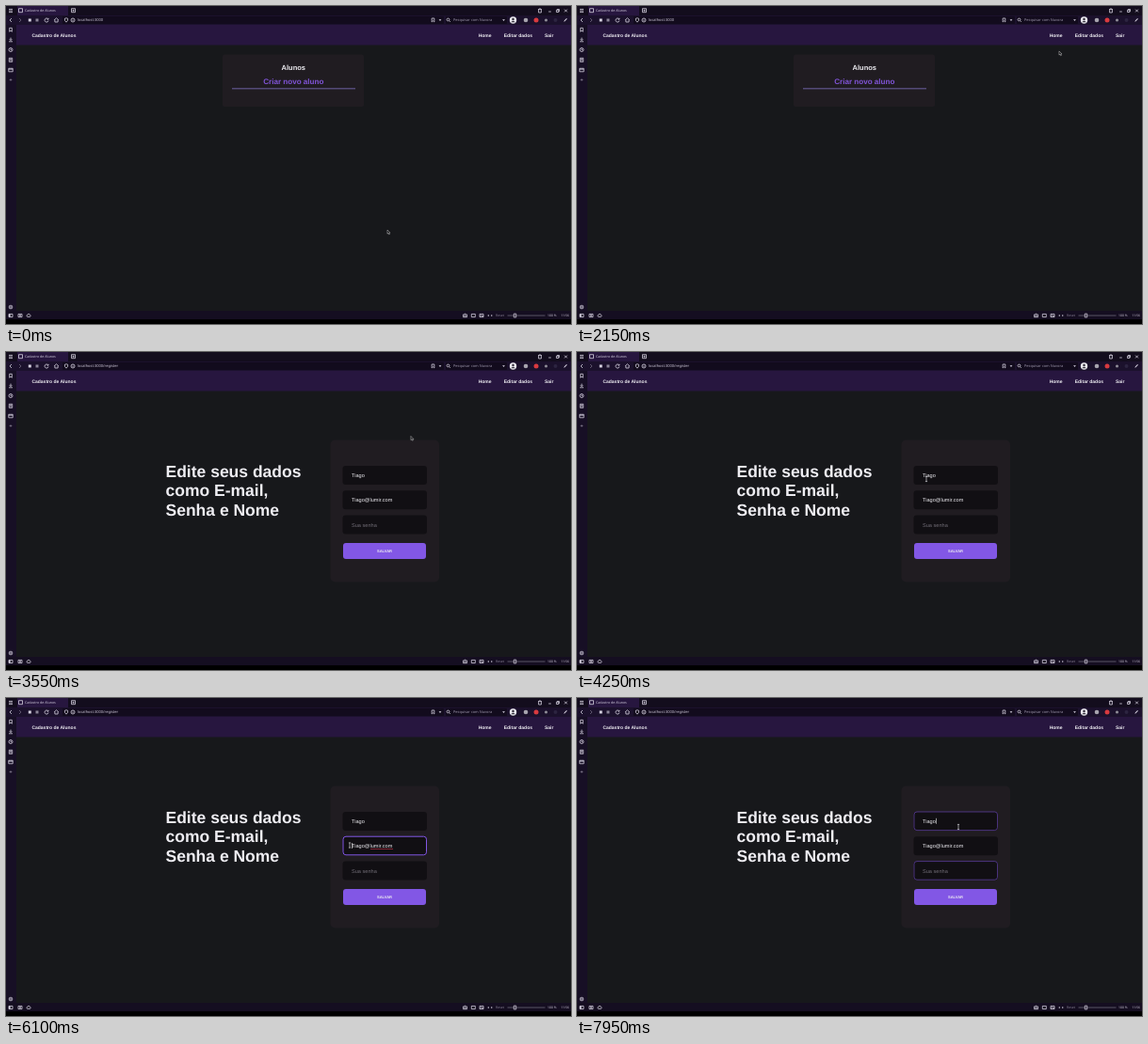
An HTML page for the animation above (8000 ms loop, 600 by 338 pixels).

```html
<!DOCTYPE html>
<html lang="pt-BR">
<head>
<meta charset="utf-8">
<title>Cadastro de Alunos</title>
<style>
  html, body { margin: 0; width: 100%; height: 100%; overflow: hidden; background: #17181b; }
  svg { display: block; width: 100vw; height: 100vh; }
  text { font-family: "Liberation Sans", Arial, sans-serif; fill: #eeedf2; text-rendering: geometricPrecision; white-space: pre; }
  .b { font-weight: 700; }
  .ui text { font-family: "Noto Sans", "Open Sans", sans-serif; fill: #cfc9da; }
  .icon { fill: none; stroke: #d5d0df; stroke-width: .8; }
  .solid { fill: #d5d0df; stroke: none; }
  .dim { opacity: .45; }
  .ring { fill: none; stroke: #8257e5; stroke-width: 1; }
</style>
</head>
<body>
<svg viewBox="0 0 600 338" preserveAspectRatio="none">
  <rect width="600" height="338" fill="#17181b"/>

  <g id="nav">
    <rect x="11" y="20" width="589" height="21.5" fill="#27163f"/>
    <rect id="hover" x="526" y="25" width="36" height="12" rx="1.5" fill="#131017"/>
    <g class="b" font-size="5">
      <text x="27.4" y="32.5">Cadastro de Alunos</text>
      <text x="501.7" y="32.5">Home</text>
      <text x="528.7" y="32.5">Editar dados</text>
      <text x="572" y="32.5">Sair</text>
    </g>
  </g>

  <g id="home">
    <rect x="230" y="51.5" width="150" height="55.5" rx="2.5" fill="#201c21"/>
    <g class="b" text-anchor="middle">
      <text x="305.3" y="67.5" font-size="7.5">Alunos</text>
      <text x="305.3" y="82.5" font-size="8.1" style="fill:#8054d8">Criar novo aluno</text>
    </g>
    <rect x="240" y="87.4" width="131" height=".9" fill="#7668b0"/>
  </g>

  <g id="edit">
    <g class="b" font-size="17.5">
      <text x="169.5" y="132.9">Edite seus dados</text>
      <text x="169.5" y="153.3">como E-mail,</text>
      <text x="169.5" y="173.7">Senha e Nome</text>
    </g>
    <rect x="344.5" y="93.5" width="115.5" height="151" rx="5" fill="#201c21"/>
    <g id="fields"></g>
    <rect x="358" y="203" width="88" height="17" rx="3" fill="#8257e5"/>
    <text class="b" x="402" y="213" font-size="4.06" text-anchor="middle">SALVAR</text>
    <rect id="caret" width=".6" height="6" fill="#eee"/>
  </g>

  <g class="ui">
    <rect width="600" height="10" fill="#130d1d"/>
    <rect x="12" width="54" height="10" fill="#27163f"/>
    <rect y="10" width="600" height="10" fill="#1b112c"/>
    <rect x="60" y="11" width="405" height="8" rx="1" fill="#120b1d"/>
    <rect x="467" y="11" width="65" height="8" rx="1" fill="#120b1d"/>
    <rect y="20" width="11" height="304" fill="#170f25"/>
    <rect y="324" width="600" height="9" fill="#150e21"/>
    <rect y="333" width="600" height="5" fill="#000"/>
    <g id="icons"></g>
    <text x="20" y="6.2" font-size="3.6">Cadastro de Alunos</text>
    <text id="url" x="76" y="16.4" font-size="4"></text>
    <text x="475" y="16.3" font-size="3.9" style="fill:#9a93a8">Pesquisar com Nuvora</text>
    <text id="status" x="30" y="330.2" font-size="3.55"></text>
    <text x="520" y="330.2" font-size="3.5" style="fill:#817a8d">Reset</text>
    <text x="575" y="330.2" font-size="3.4">100 %</text>
    <text x="589.2" y="330.2" font-size="3.4">11:56</text>
  </g>

  <g id="cursor" stroke-linejoin="round">
    <path data-shape="arrow" d="M0 0V4.2L1 3.3L1.7 4.8L2.4 4.5L1.7 3.1H3Z" fill="#0c0c0e" stroke="#d8d8dc" stroke-width=".45"/>
    <path data-shape="hand" d="M-.4 0Q0 -.5.4 0V1.7L2.3 2.2V3.8L1.6 5H-.4L-1.7 3L-1.2 2.5L-.4 3.1Z" fill="#0c0c0e" stroke="#d8d8dc" stroke-width=".45"/>
    <path data-shape="beam" d="M-1.1 -2.6H1.1M0 -2.6V2.6M-1.1 2.6H1.1" fill="none" stroke="#dedee2" stroke-width=".65"/>
  </g>
</svg>
<script>
const LOOP = 8000, STEP = 50, FADE = 200;
const $ = id => document.getElementById(id);

// [path, x, y, class]; paths are drawn around their own centre
const SQUARE = 'M-2-1.6H2V1.6H-2Z';
const BOX = 'M-1.5-1.5H1.5V1.5H-1.5Z';
const MARK = 'M-1.3-2H1.3V2L0 .8L-1.3 2Z';
const DISC = 'M-2 0A2 2 0 1 1 2 0A2 2 0 1 1-2 0Z';
const PLUS = 'M-1.4 0H1.4M0-1.4V1.4';
const DOWN = 'M-1.4-.8H1.4L0 1Z';
const ICONS = [
  ['M-2-1.6H2M-2 0H2M-2 1.6H2', 5, 5], ['M-2-2H2V2H-2Z', 15.5, 4.7],
  ['M-2-2H2V2H-2ZM-1 0H1M0-1V1', 71.5, 4.7], ['M-2-1.4H2M-1.4-1.4V2H1.4V-1.4M-.7-2.2H.7', 567, 5],
  ['M-1.3 1H1.3', 577.5, 5], ['M-1.5-.7H.8V1.5H-1.5ZM-.6-.7V-1.5H1.5V.7H.8', 586, 5],
  ['M-1.4-1.4L1.4 1.4M1.4-1.4L-1.4 1.4', 594.5, 5],
  ['M1-2L-1 0L1 2', 5, 15], ['M-1-2L1 0L-1 2', 15, 15, 'dim'],
  [BOX, 25.3, 15, 'solid'], ['M-1.3-1.6H-.4V1.6H-1.3ZM.4-1.6H1.3V1.6H.4Z', 33, 15, 'solid'],
  ['M1.6-1.2A2 2 0 1 0 2 .5M2-2.2V-.8H.6', 43, 15], ['M-2.4 0L0-2.2L2.4 0M-1.6-.4V2H1.6V-.4', 53.5, 15],
  ['M-1.6-1.7L0-2.2L1.6-1.7V.4L0 2.2L-1.6 .4Z', 64, 15], [DISC + 'M0-.2V1.1M0-1.2V-.7', 71, 15],
  [MARK, 453.5, 15], [DOWN, 461, 15, 'solid'],
  ['M1.8 1.8L.6.6M.9-.5A1.4 1.4 0 1 1-1.9-.5A1.4 1.4 0 1 1 .9-.5', 470, 15], [DOWN, 528.5, 15, 'solid'],
  ['M-1.7 1.7L-1.2.5L1.2-1.9L1.9-1.2L-.5 1.2Z', 594, 15, 'solid'],
  [MARK, 5, 25.3], ['M0-2.2V.6M-1.3-.6L0 .8L1.3-.6M-2 2H2', 5, 35.8], [DISC + 'M0-1.2V.2H1', 5, 46.5],
  ['M-1.7-2H1.7V2H-1.7ZM-.9-.7H.9M-.9.6H.9', 5, 57.3], ['M-2.2-1.7H2.2V1.8H-2.2ZM-2.2-.8H2.2', 5, 68], [PLUS, 5, 78.5, 'dim'],
  ['M-1.3 0A1.3 1.3 0 1 1 1.3 0A1.3 1.3 0 1 1-1.3 0M0-2.3V-1.3M0 1.3V2.3M-2.3 0H-1.3M1.3 0H2.3M-1.6-1.6L-1-1M1 1L1.6 1.6M1.6-1.6L1-1M-1 1L-1.6 1.6', 5, 320],
  [SQUARE, 5, 329], ['M-2-1.6H-.3V1.6H-2Z', 5, 329, 'solid'], [SQUARE + 'M-1 0H1M0-1V1', 15, 329],
  ['M-1.3 1.3A1.1 1.1 0 0 1-1.2-.8A1.4 1.4 0 0 1 1.4-.8A1.1 1.1 0 0 1 1.4 1.3Z', 24, 329],
  ['M-2-1.1H-1L-.5-1.8H.5L1-1.1H2V1.7H-2ZM-.7.3A.7.7 0 1 1 .7.3A.7.7 0 1 1-.7.3', 487.5, 329],
  [SQUARE, 496.3, 329], [SQUARE + 'M-1.6 1L-.5-.4L.4.5L1-.1L1.7 1', 505, 329], ['M-1.5-1L-2 0L-1.5 1M1.5-1L2 0L1.5 1', 514, 329],
  ['M-20 0H20', 552.5, 329, 'dim'], ['M-1.2-1.9H1.2V1.9H-1.2Z', 540.5, 329]
];
const BADGES = [[538.5, '#e9e8ee', 3.7], [552, '#a7a4ae', 2.3], [563, '#d83a3f', 2.5], [573.5, '#8e8b96', 1.6], [583.5, '#2c2440', 2]];

$('icons').innerHTML =
  ICONS.map(([d, x, y, c = '']) => `<path class="icon ${c}" d="${d}" transform="translate(${x} ${y})"/>`).join('') +
  BADGES.map(([x, c, r]) => `<circle cx="${x}" cy="15" r="${r}" fill="${c}"/>`).join('') +
  '<circle cx="538.5" cy="14" r="1.2" fill="#2b2733"/><path d="M536.2 17.3Q538.5 14.2 540.8 17.3Z" fill="#2b2733"/>';

// Form fields: top edge, text and the spans of time with focus
const FIELDS = [
  { y: 121, text: 'Tiago', focus: [[4500, 5700], [7850, 9000]] },
  { y: 147.2, text: 'Tiago@lumir.com', focus: [[5700, 6600]] },
  { y: 173.6, text: 'Sua senha', hint: true, focus: [[6600, 7850]] }
];
$('fields').innerHTML = FIELDS.map(({ y, text, hint }, i) => `
  <rect x="357.5" y="${y}" width="89.5" height="20" rx="3" fill="#110f13"/>
  ${i ? '' : '<rect id="select" x="367" y="127.4" width="14" height="6.8" fill="#2487dc"/>'}
  <text x="367" y="${y + 11.9}" font-size="5.6" ${hint ? 'style="fill:#716d76"' : ''}>${text}</text>
  ${hint ? '' : `<rect class="spell" x="${i ? 387 : 367}" y="${y + 13}" width="${i ? 24 : 14}" height=".6" fill="#d3364b"/>`}
  <rect class="ring" x="358" y="${y}" width="88.5" height="19.6" rx="3"/>`).join('');
const rings = [...document.querySelectorAll('.ring')];
const spells = [...document.querySelectorAll('.spell')];
const shapes = [...$('cursor').children];

// Pointer stops: time, x, y
const PATH = [
  [0, 405, 238], [250, 409, 205], [600, 428, 85], [900, 431.5, 47], [1050, 431.5, 47], [1250, 322, 77],
  [1350, 322, 77], [1750, 370, 74], [2200, 517, 47], [2500, 546, 33.5], [3050, 545.5, 33.5],
  [3450, 450, 82], [3900, 291, 141], [4250, 371, 135], [4550, 378, 134], [4750, 382, 137],
  [5100, 385, 140.5], [5350, 386, 139], [5550, 374, 152], [5700, 369, 156], [6100, 365, 156.5], [6300, 367, 160],
  [6450, 384, 182], [6700, 392, 184], [6950, 402, 197], [7300, 417, 159], [7550, 405, 137], [8000, 405, 137]
];
// Carets: start, end, x, field
const CARETS = [[4500, 4700, 381.3, 0], [5950, 6450, 367, 1], [6600, 7100, 367, 2], [7850, 8000, 381.3, 0]];

const during = (t, a, b) => t >= a && t < b;
const inside = (x, y, l, top, r, b) => x >= l && x <= r && y >= top && y <= b;
const clamp = v => Math.max(0, Math.min(1, v));
const show = (el, on) => el.setAttribute('visibility', on ? 'inherit' : 'hidden');
const focused = (f, t) => f.focus.some(([a, b]) => during(t, a, b));

function pointer(t) {
  const i = PATH.findIndex(p => p[0] > t);
  const [t0, x0, y0] = PATH[i - 1], [t1, x1, y1] = PATH[i];
  const p = (t - t0) / (t1 - t0), e = p * p * (3 - 2 * p);
  return [x0 + (x1 - x0) * e, y0 + (y1 - y0) * e];
}

function shapeAt(x, y, editing) {
  if (inside(x, y, 526, 25, 562, 37)) return 'hand';
  if (!editing) return inside(x, y, 275, 75, 336, 85) ? 'hand' : 'arrow';
  if (inside(x, y, 358, 203, 446, 220)) return 'hand';
  const overField = FIELDS.some(f => inside(x, y, 357, f.y, 447, f.y + 20));
  return overField || inside(x, y, 169, 117, 314, 178) ? 'beam' : 'arrow';
}

function statusAt(t, shape) {
  if (during(t, 2700, 3100)) return 'Aguardando localhost...';
  return shape === 'hand' && t >= 1400 && t < 2700 ? 'localhost:3000/register' : '';
}

function draw(t) {
  const editing = t >= 2850;
  const [x, y] = pointer(t), shape = shapeAt(x, y, editing);
  show($('home'), !editing);
  show($('edit'), editing);
  show($('hover'), inside(x, y, 526, 25, 562, 37));
  $('url').textContent = 'localhost:3000' + (t >= 3000 ? '/register' : '');
  $('status').textContent = statusAt(t, shape);

  FIELDS.forEach((f, i) => {
    const glow = f.focus.map(([a, b]) => clamp((t - a) / FADE) - clamp((t - b) / FADE));
    rings[i].setAttribute('opacity', Math.max(...glow));
  });
  show($('select'), editing && during(t, 4700, 5700));
  show(spells[0], editing && during(t, 4700, 5700));
  show(spells[1], editing && focused(FIELDS[1], t));

  const caret = CARETS.find(([a, b]) => during(t, a, b));
  show($('caret'), caret);
  if (caret) {
    $('caret').setAttribute('x', caret[2]);
    $('caret').setAttribute('y', FIELDS[caret[3]].y + 6.8);
  }
  $('cursor').setAttribute('transform', `translate(${x} ${y})`);
  shapes.forEach(s => show(s, s.dataset.shape === shape));
}

const start = performance.now();
function tick() {
  const t = (performance.now() - start) % LOOP;
  draw(Math.floor(t / STEP) * STEP);
  requestAnimationFrame(tick);
}
tick();
</script>
</body>
</html>
```
